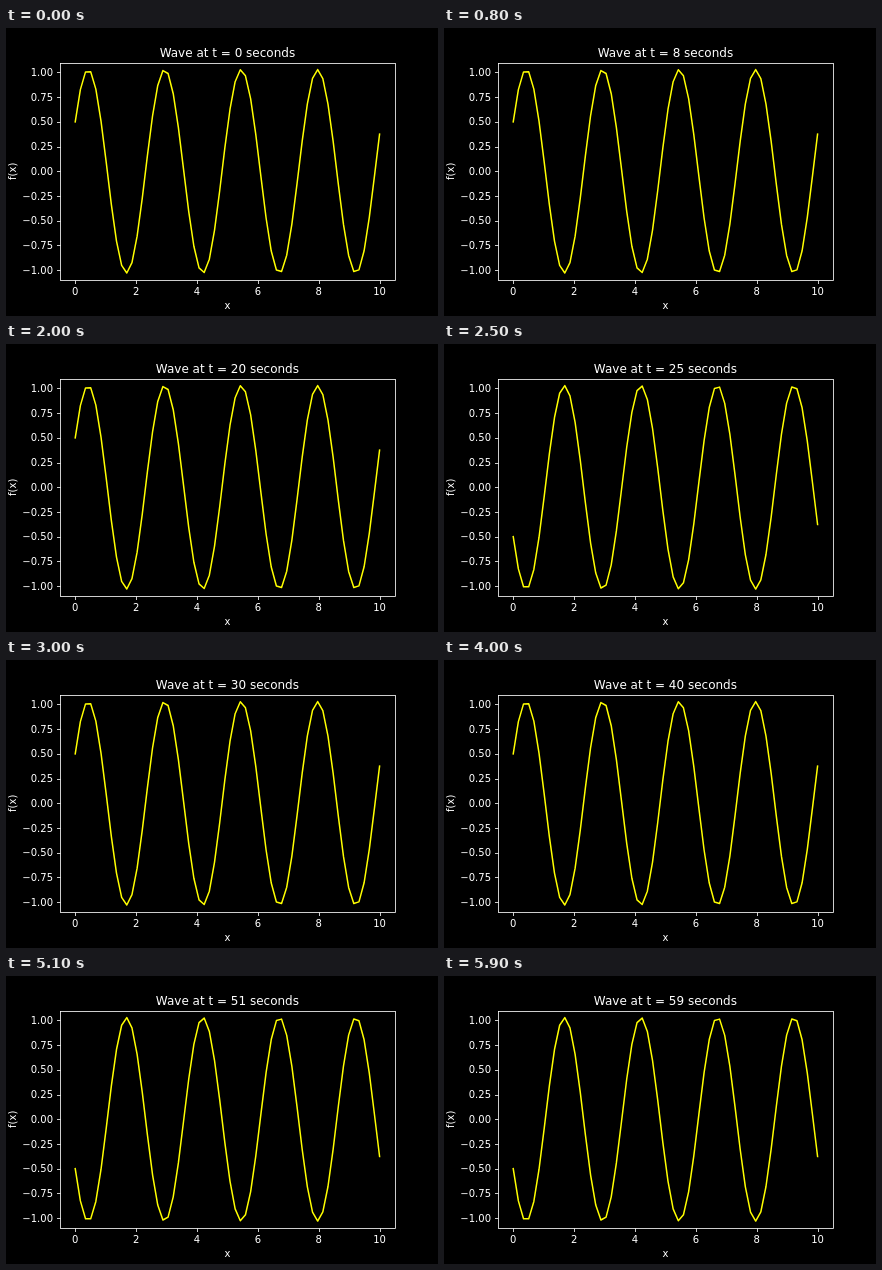
Write an HTML page with a canvas that moves like this. It is 432 by 288 pixels and loops after 6 s.

```html
<!DOCTYPE html>
<html lang="en">
<head>
<meta charset="utf-8">
<title>Wave plot</title>
<style>
  html, body { margin: 0; width: 100%; height: 100%; overflow: hidden; background: #000; }
  canvas { display: block; width: 432px; height: 288px; }
</style>
</head>
<body>
<canvas id="stage" width="432" height="288"></canvas>
<script>
const ctx = document.getElementById('stage').getContext('2d');
const STEP_MS = 100, STEPS = 60, SAMPLES = 60;
const box = { left: 54, right: 388.8, top: 34.56, bottom: 252 };
const midX = (box.left + box.right) / 2;
const midY = (box.top + box.bottom) / 2;

// Data range: x has a 5% margin around 0..10, y runs from -1.1 to 1.1.
const toX = x => box.left + (x + 0.5) / 11 * (box.right - box.left);
const toY = y => midY - y / 2.2 * (box.bottom - box.top);
const snap = v => Math.round(v) + 0.5;

const wave = (x, t) =>
  (0.9 * Math.sin(2.5 * x) + 0.5 * Math.cos(2.5 * x)) * Math.cos(Math.PI * t);

function text(str, x, y, size = 10, align = 'center') {
  ctx.font = `${size}px "DejaVu Sans", sans-serif`;
  ctx.textAlign = align;
  ctx.fillText(str, x, y);
}

function segment(x1, y1, x2, y2) {
  ctx.beginPath();
  ctx.moveTo(x1, y1);
  ctx.lineTo(x2, y2);
  ctx.stroke();
}

function drawAxes() {
  const left = snap(box.left), right = snap(box.right);
  const top = snap(box.top), bottom = snap(box.bottom);
  ctx.strokeStyle = ctx.fillStyle = '#fff';
  ctx.lineWidth = 0.8;
  ctx.strokeRect(left, top, right - left, bottom - top);

  for (let v = 0; v <= 10; v += 2) {
    const x = snap(toX(v));
    segment(x, bottom, x, bottom + 3.5);
    text(v, toX(v), 267);
  }
  for (let v = -1; v <= 1; v += 0.25) {
    const y = snap(toY(v));
    segment(left - 3.5, y, left, y);
    text(v.toFixed(2).replace('-', '\u2212'), 47, Math.round(toY(v) + 3.6), 10, 'right');
  }

  text('x', midX, 281);
  ctx.save();
  ctx.translate(10, midY);
  ctx.rotate(-Math.PI / 2);
  text('f(x)', 0, 0);
  ctx.restore();
}

function drawWave(t) {
  ctx.beginPath();
  for (let i = 0; i < SAMPLES; i++) {
    const x = i * 10 / (SAMPLES - 1);
    ctx.lineTo(toX(x), toY(wave(x, t)));
  }
  ctx.strokeStyle = '#ff0';
  ctx.lineWidth = 1.5;
  ctx.lineJoin = 'round';
  ctx.lineCap = 'square';
  ctx.stroke();
  ctx.lineJoin = 'miter';
  ctx.lineCap = 'butt';
}

function draw(t) {
  ctx.fillStyle = '#000';
  ctx.fillRect(0, 0, 432, 288);
  drawWave(t);
  drawAxes();
  text(`Wave at t = ${t} seconds`, midX, 29, 12);
}

function tick() {
  draw(Math.floor(performance.now() / STEP_MS) % STEPS);
  requestAnimationFrame(tick);
}
tick();
</script>
</body>
</html>
```
